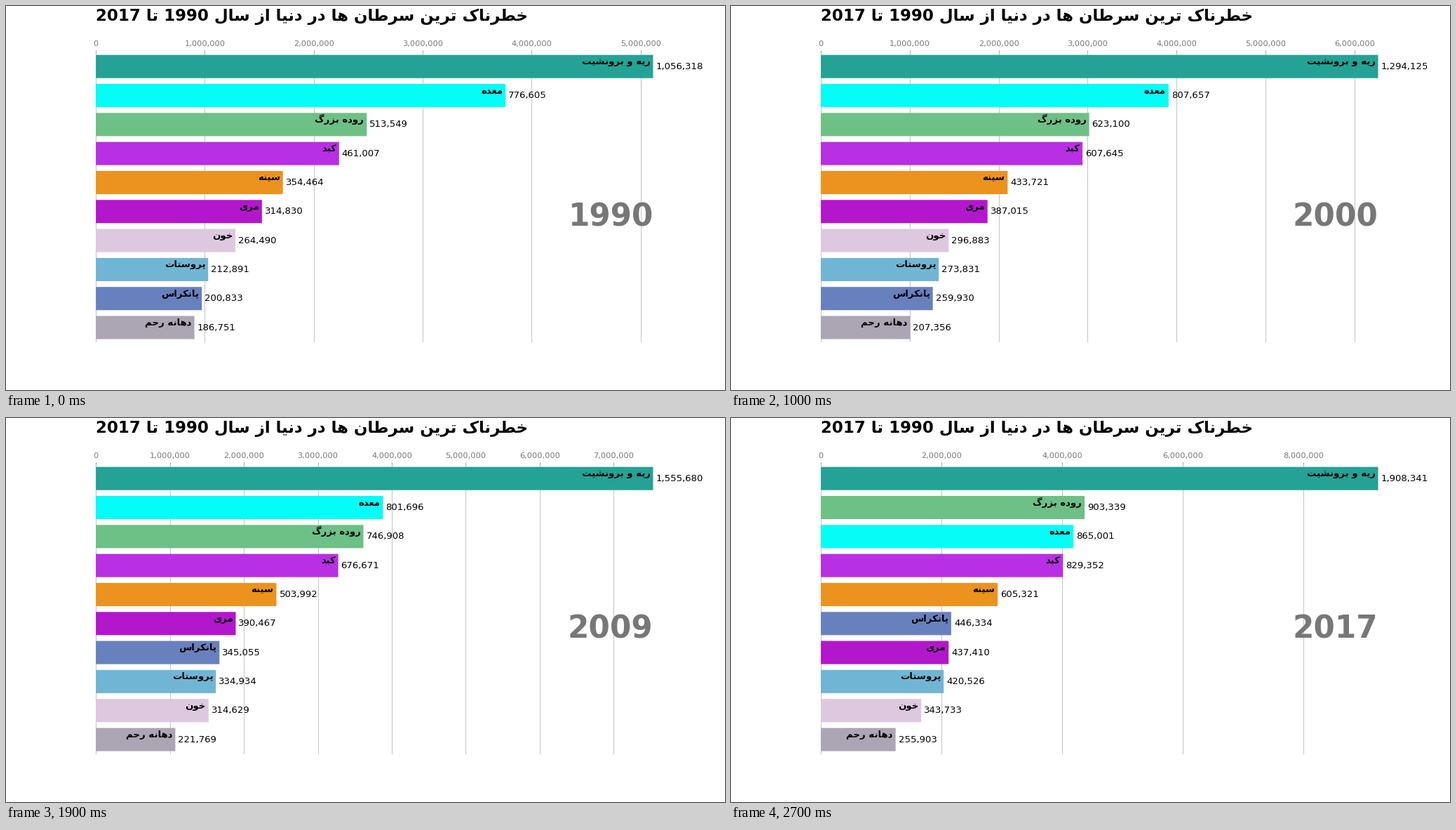
These frames come from a looping animation (1025 by 547 pixels, 2800 ms). A matplotlib script:

```python
import numpy as np
import matplotlib.pyplot as plt
from matplotlib.animation import FuncAnimation
from matplotlib.ticker import StrMethodFormatter

WIDTH, HEIGHT, DPI = 1025, 547, 64
FIRST_YEAR, LAST_YEAR = 1990, 2017
AXIS_SCALE = 4.8419  # axis units per counted case
GREY = "#777777"

plt.rcParams["font.family"] = "DejaVu Sans"

# Cases in a few key years; every other year follows a smooth curve.
KEY_YEARS = np.array([1990, 2000, 2004, 2009, 2017])
SERIES = [
    ("ریه و برونشیت", "#25a296", [1056318, 1294125, 1402543, 1555680, 1908341]),
    ("معده", "#04fdf6", [776605, 807657, 826388, 801696, 865001]),
    ("روده بزرگ", "#6dc086", [513549, 623100, 671496, 746908, 903339]),
    ("کبد", "#b82fe4", [461007, 607645, 643147, 676671, 829352]),
    ("سینه", "#ec921f", [354464, 433721, 461175, 503992, 605321]),
    ("مری", "#b217cb", [314830, 387015, 407536, 390467, 437410]),
    ("خون", "#dec8e0", [264490, 296883, 299333, 314629, 343733]),
    ("پروستات", "#70b6d4", [212891, 273831, 298757, 334934, 420526]),
    ("پانکراس", "#6880be", [200833, 259930, 291886, 345055, 446334]),
    ("دهانه رحم", "#aca5b4", [186751, 207356, 214046, 221769, 255903]),
]

RIGHT_JOINING = set("اةدذرزو")


def presentation_forms():
    """Map each letter to its isolated form; final, initial, medial follow it."""
    forms = {"پ": 0xFB56, "ک": 0xFB8E, "گ": 0xFB92, "ی": 0xFBFC}
    code = 0xFE8D
    for letter in "ابةتثجحخدذرزسشصضطظعغفقكلمنهو":
        forms[letter] = code
        code += 2 if letter in RIGHT_JOINING else 4
    return forms


ISOLATED = presentation_forms()


def shape_word(word):
    """Join the letters of one word and put them in visual order."""
    if word.isdigit():
        return word
    glyphs = []
    for i, letter in enumerate(word):
        joins_before = i > 0 and word[i - 1] not in RIGHT_JOINING
        joins_after = i < len(word) - 1 and letter not in RIGHT_JOINING
        glyphs.append(chr(ISOLATED[letter] + joins_before + 2 * joins_after))
    return "".join(reversed(glyphs))


def persian(text):
    return " ".join(shape_word(word) for word in reversed(text.split()))


def pt(size):
    """Convert a size meant for a 15 inch wide figure to this resolution."""
    return size * WIDTH / 15 / DPI


def value_at(year, values):
    """Cubic Hermite curve through the key values."""
    slopes = np.gradient(np.array(values, float), KEY_YEARS, edge_order=2)
    k = np.searchsorted(KEY_YEARS[1:-1], year, side="right")
    span = KEY_YEARS[k + 1] - KEY_YEARS[k]
    t = (year - KEY_YEARS[k]) / span
    blend = t * t * (3 - 2 * t)
    bend = t * (1 - t) ** 2 * slopes[k] - t * t * (1 - t) * slopes[k + 1]
    return values[k] * (1 - blend) + values[k + 1] * blend + span * bend


TITLE = persian("خطرناک ترین سرطان ها در دنیا از سال 1990 تا 2017")

fig = plt.figure(figsize=(WIDTH / DPI, HEIGHT / DPI), dpi=DPI, facecolor="white")
ax = fig.add_axes([0.125, 0.125, 0.775, 0.755])


def style_axes(limit, rows):
    margin = 0.01 * (rows - 0.2)
    ax.set_frame_on(False)
    ax.set_xlim(0, limit)
    ax.set_ylim(-0.4 - margin, rows - 0.6 + margin)
    ax.set_yticks([])
    ax.xaxis.set_ticks_position("top")
    ax.xaxis.set_major_formatter(StrMethodFormatter("{x:,.0f}"))
    ax.tick_params(axis="x", colors=GREY, labelsize=pt(12), length=pt(3.5),
                   width=pt(0.8), pad=pt(3.5))
    ax.grid(axis="x", color="#b0b0b0", linewidth=pt(0.8))
    ax.set_axisbelow(True)


def draw(frame):
    year = FIRST_YEAR + frame
    ranked = sorted((value_at(year, values), name, color)
                    for name, color, values in SERIES)
    limit = ranked[-1][0] * AXIS_SCALE
    gap = limit / 200

    ax.clear()
    for row, (value, name, color) in enumerate(ranked):
        end = value * AXIS_SCALE
        ax.barh(row, end, height=0.8, color=color, snap=False)
        ax.text(end - gap, row, persian(name), size=pt(14), weight="bold",
                ha="right", va="bottom")
        ax.text(end + gap, row, f"{value:,.0f}", size=pt(14),
                ha="left", va="center")
    style_axes(limit, len(ranked))

    ax.text(1, 0.4, str(year), transform=ax.transAxes, color=GREY,
            size=pt(46), weight="bold", ha="right")
    ax.text(0, 1.15, TITLE, transform=ax.transAxes, size=pt(24.1),
            weight="bold", ha="left", va="top")
    return []


anim = FuncAnimation(fig, draw, frames=LAST_YEAR - FIRST_YEAR + 1,
                     interval=100, repeat=True, repeat_delay=0)
plt.show()
```
